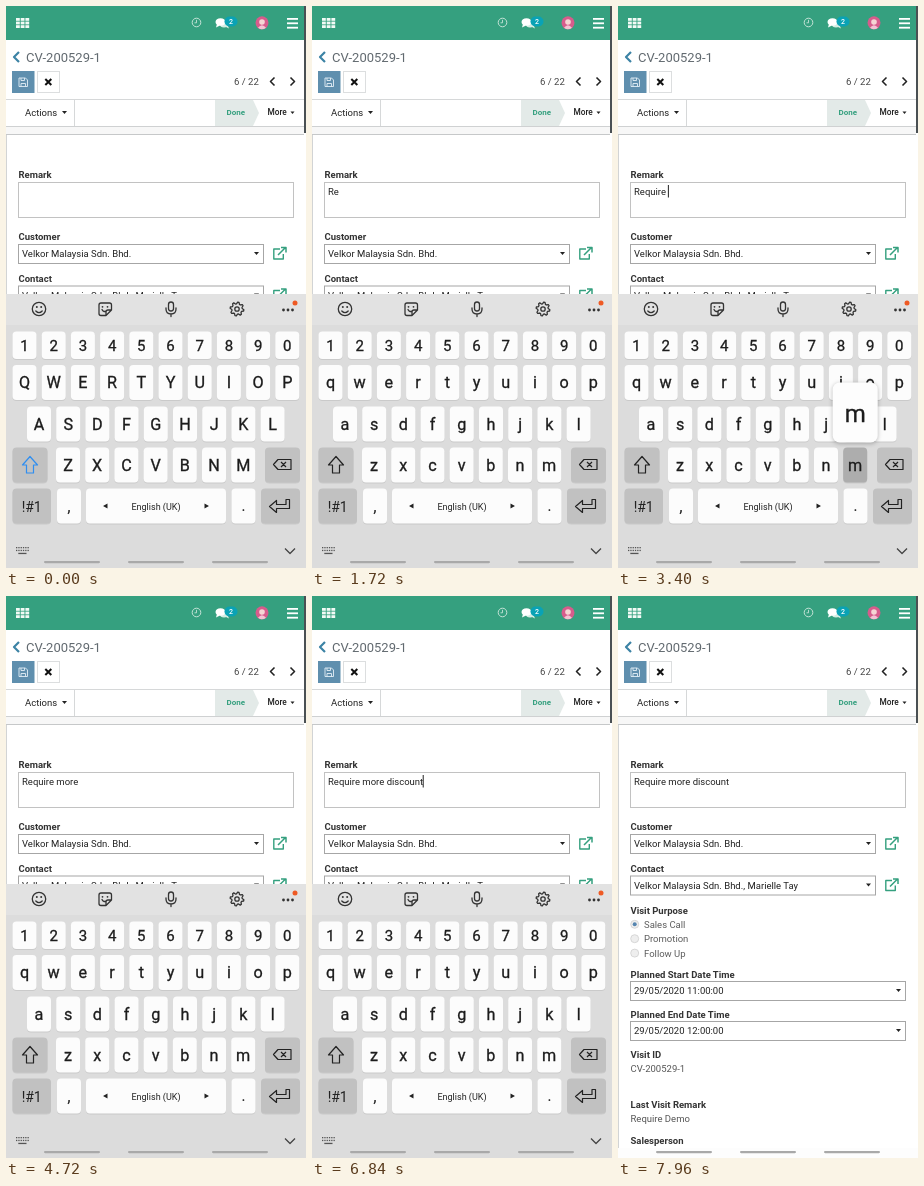
Recreate the animation shown at these times as an HTML page. Size 300x562 px, loop 8 s.

```html
<!DOCTYPE html>
<html lang="en">
<head>
<meta charset="utf-8">
<title>Visit remark</title>
<style>
html, body { margin: 0; width: 100%; height: 100%; overflow: hidden; background: #fff; }
svg { display: block; width: 300px; height: 562px; }
text { font-family: Roboto, Arial, sans-serif; white-space: pre; }
.key { stroke: #1c1c1c; stroke-width: .3px; }
</style>
</head>
<body>
<svg id="stage" viewBox="0 0 300 562">
  <g id="page"></g>
  <g id="keyboard"></g>
  <g id="nav"></g>
</svg>
<script>
const LOOP = 8000;
const MESSAGE = 'Require more discount';
// Press time of each character in MESSAGE
const PRESSES = [820, 1110, 1850, 2150, 2400, 2640, 2880, 3110, 3330, 3650, 3880,
  4110, 4760, 4960, 5140, 5310, 5450, 5740, 5960, 6180, 6400];
const COMMIT = 90, POPUP = 150, BLINK = 500;
const HIDE_START = 7100, HIDE_TIME = 250;

const $ = id => document.getElementById(id);
const page = $('page'), keyboard = $('keyboard'), nav = $('nav');

function el(parent, tag, attrs, content) {
  const node = document.createElementNS('http://www.w3.org/2000/svg', tag);
  for (const name in attrs) node.setAttribute(name, attrs[name]);
  if (content !== undefined) node.textContent = content;
  parent.appendChild(node);
  return node;
}
const rect = (parent, x, y, width, height, fill, more) =>
  el(parent, 'rect', { x, y, width, height, fill, ...more });
const circle = (parent, cx, cy, r, fill, more) => el(parent, 'circle', { cx, cy, r, fill, ...more });
const fillPath = (parent, d, fill) => el(parent, 'path', { d, fill });
const line = (parent, d, stroke, width = 1, more) => el(parent, 'path', {
  d, stroke, 'stroke-width': width, fill: 'none', 'stroke-linejoin': 'round', ...more });
const label = (parent, x, y, content, size = 9.5, fill = '#222', weight = 400, anchor = 'start') =>
  el(parent, 'text', { x, y, 'font-size': size, fill, 'font-weight': weight, 'text-anchor': anchor }, content);

function keyLabel(parent, x, y, content, size) {
  const node = label(parent, x, y, content, size, '#1c1c1c', 400, 'middle');
  node.setAttribute('class', 'key');
  return node;
}

function drawHeader() {
  rect(page, 0, 0, 300, 34, '#35a07f');
  for (let i = 0; i < 9; i++)
    rect(page, 10 + (i % 3) * 4.7, 12 + Math.floor(i / 3) * 3.6, 3.8, 2.8, '#f2faf6');
  circle(page, 190.5, 16.5, 4.3, 'none', { stroke: '#c5e3d7' });
  line(page, 'M190.5 13.8v3h-2', '#c5e3d7', .9);
  el(page, 'ellipse', { cx: 218, cy: 18.5, rx: 4, ry: 3, fill: '#d5ede3' });
  fillPath(page, 'M218 20h4l1 2.5z', '#d5ede3');
  el(page, 'ellipse', { cx: 214.5, cy: 16, rx: 5, ry: 3.8, fill: '#fff' });
  fillPath(page, 'M211 18l-1 3.5 4-2z', '#fff');
  rect(page, 218.5, 10.5, 13, 10, '#0aa2b5', { rx: 5 });
  label(page, 225, 18.1, '2', 7, '#fff', 500, 'middle');
  circle(page, 256, 16.8, 6.5, '#d65c8c');
  circle(page, 256, 16, 2.8, '#f6d5d4');
  fillPath(page, 'M252 21.8q4-5 8 0q-4 3-8 0z', '#f3c3d3');
  for (const y of [12, 16.4, 20.8]) rect(page, 281, y, 11, 1.8, '#fff');
}

function drawControls() {
  line(page, 'M13 46l-5 5 5 5', '#3c83a5', 2.2);
  label(page, 20, 56, 'CV-200529-1', 13, '#626a70');
  rect(page, 6, 65, 22.5, 22, '#5f8fae');
  line(page, 'M13 72h6.5l2 2v6.5H13zM15 72v2.5h3.5V72M15 80.5v-3h4.5v3', '#e3eef5', .9);
  rect(page, 31.5, 65.5, 22, 21, '#fff', { stroke: '#dcdedf' });
  line(page, 'M39.3 73l6 6M45.3 73l-6 6', '#111', 2);
  label(page, 228, 79, '6 / 22', 9.6, '#444');
  line(page, 'M268.5 71.5l-4 4 4 4M284.5 71.5l4 4-4 4', '#222', 1.6);

  rect(page, 0, 93, 298, 1, '#d6d8d9');
  rect(page, 68, 94, 1, 26, '#d6d8d9');
  label(page, 19, 110.3, 'Actions');
  fillPath(page, 'M56 105h5l-2.5 3z', '#222');
  fillPath(page, 'M209 94h38l6 13-6 13h-38z', '#e3eae8');
  label(page, 220.5, 109.3, 'Done', 8, '#35a07f', 700);
  label(page, 261.5, 109.3, 'More', 8.3, '#222', 500);
  fillPath(page, 'M284.5 105.5h4l-2 2.4z', '#222');
  rect(page, 0, 120, 298, 1, '#cfd1d2');
  rect(page, 0, 121, 298, 8, '#f7f7f7');
  rect(page, 0, 128, 298, 1, '#c6c8c9');
  rect(page, 0, 129, 1, 423, '#d2d4d5');
  rect(page, 298, 0, 2, 127, '#4a5053');
}

const heading = (y, content) => label(page, 12.5, y, content, 9.5, '#333', 700);

function box(y, width, height, stroke = '#a6a6a6') {
  rect(page, 12.5, y + .5, width, height, '#fff', { stroke });
}

function select(y, width, value) {
  box(y, width, 19);
  label(page, 16, y + 13.2, value);
  const x = 12 + width - 9;
  fillPath(page, `M${x} ${y + 8}h5l-2.5 3z`, '#222');
}

function externalLink(y) {
  line(page, `M274 ${y + 5}h-6.2v10h9.5v-5`, '#35a07f', 1.4);
  line(page, `M272 ${y + 11}l7-7M275 ${y + 3.5}h5v5`, '#35a07f', 1.5);
}

function drawForm() {
  heading(172, 'Remark');
  box(176, 275, 35, '#c2c2c2');
  heading(234, 'Customer');
  select(238, 245, 'Velkor Malaysia Sdn. Bhd.');
  externalLink(238);
  heading(275.5, 'Contact');
  select(279.5, 245, 'Velkor Malaysia Sdn. Bhd., Marielle Tay');
  externalLink(279.5);
  heading(317.5, 'Visit Purpose');
  ['Sales Call', 'Promotion', 'Follow Up'].forEach((name, i) => {
    const y = 328.3 + i * 14.4;
    circle(page, 16.7, y, 4, '#eee', { stroke: '#d0d0d0', 'stroke-width': .8 });
    if (!i) circle(page, 16.7, y, 2, '#5585b0');
    label(page, 26, y + 3.4, name, 9.5, '#5c5c5c');
  });
  heading(381.5, 'Planned Start Date Time');
  select(385, 275, '29/05/2020 11:00:00');
  heading(421.5, 'Planned End Date Time');
  select(425, 275, '29/05/2020 12:00:00');
  heading(461.5, 'Visit ID');
  label(page, 12.5, 475.5, 'CV-200529-1', 9.5, '#555');
  heading(512, 'Last Visit Remark');
  label(page, 12.5, 526, 'Require Demo', 9.5, '#555');
  heading(548, 'Salesperson');
}

const keys = {};
function key(name, x, y, width, height, fill = '#fcfcfc') {
  rect(keyboard, x, y + 1, width, height, '#cacaca', { rx: 4 });
  const face = rect(keyboard, x, y, width, height, fill, { rx: 4 });
  keys[name] = { face, x: x + width / 2, y };
}

function letterRow(letters, firstX, y, height = 35) {
  [...letters].forEach((char, i) => {
    const x = firstX + i * 29.2;
    key(char, x - 12, y, 24, height);
    keys[char].text = keyLabel(keyboard, x, y + height / 2 + 5.7, char, /\d/.test(char) ? 15 : 16.2);
  });
}

function drawToolbar() {
  const ink = '#333', stroke = (d, w = 1.3) => line(keyboard, d, ink, w, { 'stroke-linecap': 'round' });
  circle(keyboard, 33, 303, 6.7, 'none', { stroke: ink, 'stroke-width': 1.3 });
  stroke('M29.8 305q3.2 3.4 6.4 0');
  for (const x of [30.8, 35.2]) circle(keyboard, x, 301, 1, ink);
  stroke('M95 297h8.5q2 0 2 2v5l-5.5 5.5h-5q-2 0-2-2V299q0-2 2-2zM105.5 304h-3.5q-2 0-2 2v3.5M96 303.5q1.5 3 4 1.5');
  for (const x of [96.5, 101.5]) circle(keyboard, x, 300.8, .9, ink);
  rect(keyboard, 162.5, 296, 5, 9, 'none', { rx: 2.5, stroke: ink, 'stroke-width': 1.3 });
  stroke('M160 302v1q0 5 5 5t5-5v-1M165 308v2.5');
  let gear = '';
  for (let i = 0; i < 32; i++) {
    const angle = (i + .5) * Math.PI / 16, r = i % 4 < 2 ? 6.9 : 5.2;
    gear += `${i ? 'L' : 'M'}${231 + r * Math.cos(angle)} ${303 + r * Math.sin(angle)}`;
  }
  stroke(gear + 'z');
  circle(keyboard, 231, 303, 2.2, 'none', { stroke: ink, 'stroke-width': 1.3 });
  for (const x of [277.5, 282, 286.5]) circle(keyboard, x, 304, 1.4, ink);
  circle(keyboard, 289, 297, 2.5, '#ee5a24');
}

function drawKeyboard() {
  const grey = '#c1c1c1', ink = '#222';
  rect(keyboard, 0, 288, 300, 274, '#dcdcdc');
  rect(keyboard, 0, 288, 300, 31, '#e2e2e2');
  drawToolbar();
  letterRow('1234567890', 18.5, 325.5, 27.5);
  letterRow('qwertyuiop', 18.5, 359);
  letterRow('asdfghjkl', 33, 400.5);
  letterRow('zxcvbnm', 62, 441.5);

  key('shift', 6.5, 441.5, 35, 35, grey);
  keys.shift.arrow = line(keyboard, 'M24 450.5l-7.5 8.5h4v8h7v-8h4z', ink, 1.2);
  key('backspace', 259, 441.5, 35, 35, grey);
  line(keyboard, 'M272 453.5h13v10h-13l-4.5-5zM275 456l5 5M280 456l-5 5', ink, 1.2);

  key('symbols', 6.5, 482.5, 38.5, 35, grey);
  label(keyboard, 25.7, 505.5, '!#1', 14, ink, 400, 'middle');
  key(',', 51, 482.5, 24, 35);
  label(keyboard, 63, 506, ',', 17, ink, 400, 'middle');
  key(' ', 80, 482.5, 140, 35);
  label(keyboard, 150, 503.5, 'English (UK)', 9, ink, 400, 'middle');
  fillPath(keyboard, 'M97 500l4.5-2.5v5zM203 500l-4.5-2.5v5z', ink);
  key('.', 225.5, 482.5, 24, 35);
  label(keyboard, 237.5, 505, '.', 17, ink, 400, 'middle');
  key('enter', 255, 482.5, 39, 35, grey);
  line(keyboard, 'M280 493.5h3.5v9h-13v4l-7-6 7-6v4h9.5z', ink, 1.2);

  for (let i = 0; i < 12; i++)
    rect(keyboard, 10 + (i % 6) * 2.3, 541 + Math.floor(i / 6) * 2.8, 1.3, 1.3, '#555');
  rect(keyboard, 12.3, 546.8, 8.2, 1.3, '#555');
  line(keyboard, 'M279 542.5l5 5 5-5', '#444', 1.3);
}

drawHeader();
drawControls();
drawForm();
const remark = label(page, 16, 188.5, '');
const caret = rect(page, 0, 179, 1, 12.5, '#222');
drawKeyboard();

const popup = el(keyboard, 'g', {});
popup.style.filter = 'drop-shadow(0 1px 2px rgba(0,0,0,.28))';
rect(popup, -22.5, -65, 45, 60, '#fdfdfd', { rx: 7 });
const popupText = keyLabel(popup, 0, -26, '', 24);

const navBar = rect(nav, 0, 552, 300, 10, '#fdfdfd');
for (const x of [38, 122, 206]) rect(nav, x, 555, 56, 2.2, '#a9a9a9', { rx: 1.1 });

const show = (node, visible) => node.setAttribute('visibility', visible ? 'visible' : 'hidden');
const letters = Object.keys(keys).filter(name => /^[a-z]$/.test(name));

function render(time) {
  const typed = PRESSES.filter(press => time >= press + COMMIT).length;
  const lastCommit = typed ? PRESSES[typed - 1] + COMMIT : -BLINK;
  const upper = typed === 0;
  const hide = Math.min(1, Math.max(0, (time - HIDE_START) / HIDE_TIME));

  remark.textContent = MESSAGE.slice(0, typed);
  caret.setAttribute('x', 15.5 + (typed ? remark.getComputedTextLength() : 0));
  show(caret, hide === 0 && (time - lastCommit) % (2 * BLINK) < BLINK);

  for (const name of letters) keys[name].text.textContent = upper ? name.toUpperCase() : name;
  keys.shift.arrow.setAttribute('stroke', upper ? '#2f8ef0' : '#222');

  for (const name of [...letters, ' ']) keys[name].face.setAttribute('fill', '#fcfcfc');
  const active = PRESSES.findIndex(press => time >= press && time < press + POPUP);
  const char = MESSAGE[active];
  if (char) {
    const pressed = keys[char.toLowerCase()];
    if (time < PRESSES[active] + COMMIT) pressed.face.setAttribute('fill', '#adadad');
    popup.setAttribute('transform', `translate(${pressed.x} ${pressed.y})`);
    popupText.textContent = char;
  }
  show(popup, char && char !== ' ');

  keyboard.setAttribute('transform', `translate(0 ${274 * hide * hide})`);
  show(keyboard, hide < 1);
  show(navBar, hide === 1);
}

const start = performance.now();
function frame(now) {
  render(Math.max(0, now - start) % LOOP);
  requestAnimationFrame(frame);
}
render(0);
requestAnimationFrame(frame);
</script>
</body>
</html>
```
